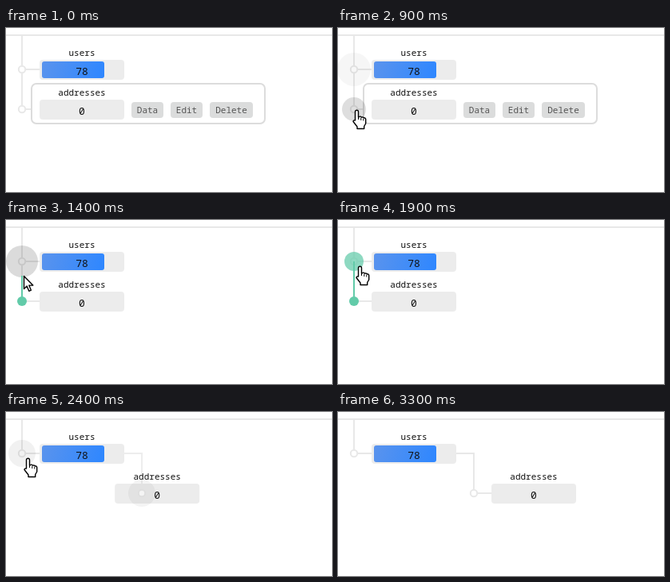
Recreate the animation shown at these times as an HTML page with a canvas. Size 408x206 px, loop 3600 ms.

```html
<!DOCTYPE html>
<html lang="en">
<head>
<meta charset="utf-8">
<title>Schema tree</title>
<style>
html, body { margin: 0; width: 408px; height: 206px; overflow: hidden; background: #fff; }
canvas { display: block; }
</style>
</head>
<body>
<canvas id="stage" width="408" height="206"></canvas>
<script>
const ctx = document.getElementById('stage').getContext('2d');
const LINE = '#e8e8e8', GREEN = '#62cba9';
const FONT = '"Noto Sans Mono", "DejaVu Sans Mono", monospace';
const HAND = new Path2D('M-1.5 13V2.2a2 2 0 0 1 4 0V9l1-.5a1.8 1.8 0 0 1 2.8.8 1.8 1.8 0 0 1 2.8.8 1.7 1.7 0 0 1 2.6 1.5V17l-2 3.5v3H1V21L-4 14.5a1.8 1.8 0 0 1 2.5-1.5z');
const ARROW = new Path2D('M.5 .5V16.5L4.1 13.1 6.8 19.3 9.4 18.2 6.8 12.1H11.8z');

// Pointer path: time, x, y
const PATH = [[100, 388, 186], [600, 23, 103], [1200, 23, 103], [1400, 22, 70],
  [1700, 27, 58], [2400, 27, 58], [2700, 176, 177]];

function pointerAt(t) {
  const i = Math.max(1, PATH.findIndex(k => k[0] >= t));
  const [a, b] = [PATH[i - 1], PATH[i]];
  const p = (t - a[0]) / (b[0] - a[0]);
  return [a[1] + (b[1] - a[1]) * p, a[2] + (b[2] - a[2]) * p];
}

function rect(x, y, w, h, r, fill) {
  ctx.beginPath();
  ctx.roundRect(x, y, w, h, r);
  ctx.fillStyle = fill;
  ctx.fill();
}

function text(s, x, y, size, color) {
  ctx.font = size + 'px ' + FONT;
  ctx.textAlign = 'center';
  ctx.fillStyle = color;
  ctx.fillText(s, x, y);
}

function line(color, ...points) {
  ctx.beginPath();
  points.forEach(p => ctx.lineTo(...p));
  ctx.strokeStyle = color;
  ctx.lineWidth = 2;
  ctx.stroke();
}

function disc(x, y, r, color) {
  ctx.beginPath();
  ctx.arc(x, y, r, 0, 7);
  ctx.fillStyle = color;
  ctx.fill();
}

function node(x, y) {
  disc(x, y, 4.2, '#fff');
  ctx.strokeStyle = LINE;
  ctx.lineWidth = 2;
  ctx.stroke();
}

function table(x, y, name, count) {
  rect(x, y, 106, 25, 4, '#ececec');
  if (count) {
    const g = ctx.createLinearGradient(x, y, x + 78, y + 25);
    g.addColorStop(0, '#5c94ec');
    g.addColorStop(1, '#2f87ff');
    rect(x + 3, y + 2, 78, 21, 3, g);
  }
  text(name, x + 53, y - 5, 11, '#111');
  text(count, x + 53, y + 19, 13, '#111');
}

function panel() {
  rect(32, 70, 292, 50, 6, '#fff');
  ctx.strokeStyle = '#dcdcdc';
  ctx.lineWidth = 2;
  ctx.stroke();
  [['Data', 157, 40], ['Edit', 206, 40], ['Delete', 255, 54]].forEach(([s, x, w]) => {
    rect(x, 93, w, 20, 4, '#dbdcdc');
    text(s, x + w / 2, 107, 11, '#555');
  });
}

function halos(t) {
  const gray = a => `rgba(0,0,0,${a})`;
  if (t >= 600 && t < 1200) {
    disc(20, 52, t < 700 ? 18 : 21, gray(.035));
    disc(20, 102, t < 700 ? 13 : 15, gray(.13));
  } else if (t >= 1200 && t < 1900) {
    disc(20, 52, 20, gray(.14));
  } else if (t >= 1900 && t < 2300) {
    disc(20, 52, 12 - (t - 1900) / 80, 'rgba(98,203,169,.72)');
  } else if (t >= 2300 && t < 2500) {
    disc(20, 52, 17, gray(.055));
    disc(170, 102, 17, gray(.045));
  }
}

function draw(t) {
  const nested = t >= 2300, dragging = t >= 1300 && !nested;
  const [px, py] = pointerAt(Math.min(t, 2700));
  const shift = t > 2311 ? 150 * (1 - Math.exp((2311 - t) / 90)) : 0;
  const left = 42 + shift;

  ctx.fillStyle = '#fff';
  ctx.fillRect(0, 0, 408, 206);
  line(LINE, [0, 9], [408, 9]);
  line(LINE, [20, 10], [20, nested ? 52 : 102]);
  line(LINE, [20, 52], [42, 52]);
  if (nested) {
    ctx.globalAlpha = Math.min(1, (t - 2300) / 130);
    line(LINE, [148, 52], [170, 52], [170, 102], [Math.max(170, left), 102]);
    ctx.globalAlpha = 1;
  } else {
    line(LINE, [20, 102], [42, 102]);
  }

  if (t < 1100) panel();
  table(42, 40, 'users', 78);
  table(left, 90, 'addresses', 0);

  node(20, 52);
  if (t >= 2400) node(170, 102);
  else if (!nested) node(20, 102);
  halos(t);
  if (dragging) {
    line(GREEN, [20, 102], [20, t < 1700 ? py : 52]);
    disc(20, 102, 6, GREEN);
  }

  if (t >= 100 && t < 2800) {
    const hand = t >= 600 && t < 1300 || t >= 1700 && t < 2500;
    const shape = hand ? HAND : ARROW;
    ctx.save();
    ctx.translate(px, py);
    ctx.lineJoin = 'round';
    ctx.lineWidth = 1.4;
    ctx.strokeStyle = '#000';
    ctx.fillStyle = '#fff';
    ctx.fill(shape);
    ctx.stroke(shape);
    if (hand) {
      ctx.lineWidth = 1;
      ctx.stroke(new Path2D('M2.5 9v3M5.8 10v3M8.8 11v2.5'));
    }
    ctx.restore();
  }
}

const start = performance.now();
function tick() {
  const t = (performance.now() - start) % 3600;
  draw(Math.min(3300, Math.floor(t / 100) * 100));
  requestAnimationFrame(tick);
}
tick();
</script>
</body>
</html>
```
